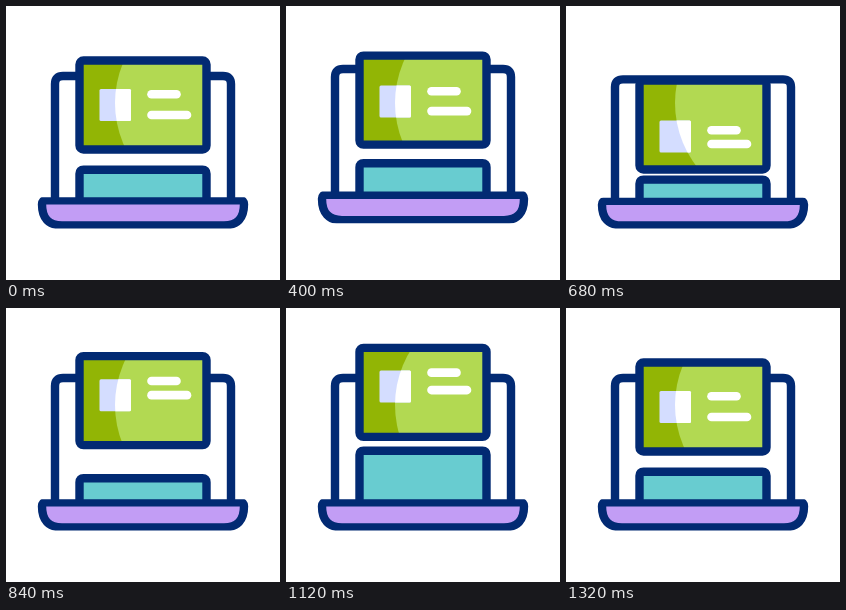
Animation, 274 px wide and 274 px high, one loop 2000 ms. Source, as an HTML page:

```html
<!DOCTYPE html>
<html lang="en">
<head>
<meta charset="utf-8">
<title>Laptop card</title>
<style>
  html, body { margin: 0; width: 100%; height: 100%; overflow: hidden; background: #fff; }
  svg { display: block; width: 100vw; height: 100vh; }
  .line { stroke: #022a73; stroke-width: 8.4; stroke-linejoin: round; }
</style>
</head>
<body>
<svg viewBox="0 0 274 274">
  <defs>
    <clipPath id="inside"><rect id="cardClip" x="73.5" y="54.5" width="127" height="89"/></clipPath>
    <clipPath id="shine"><circle cx="213" cy="97" r="104"/></clipPath>
    <clipPath id="trim"><rect x="28" y="191.2" width="218" height="31.3"/></clipPath>
    <rect id="photo" x="93.5" y="83" width="31.5" height="32" rx="1.5"/>
  </defs>
  <path id="frame" class="line" fill="#fff" d="M49 196V78q0-8 8-8H217q8 0 8 8V196"/>
  <path id="panel" class="line" fill="#68ccd0" d="M73.5 225V167.7q0-4 4-4H196.5q4 0 4 4V225"/>
  <g clip-path="url(#inside)">
    <rect width="274" height="274" fill="#92b505"/>
    <circle cx="213" cy="97" r="104" fill="#b2d952"/>
    <use href="#photo" fill="#d4ddff"/>
    <g clip-path="url(#shine)"><use href="#photo" fill="#fff"/></g>
    <g stroke="#fff" stroke-width="8.6" stroke-linecap="round">
      <path id="bar1" d="M145.5 88.3H170.5"/>
      <path id="bar2" d="M145.5 109H181"/>
    </g>
  </g>
  <rect id="card" class="line" fill="none" x="73.5" y="54.5" width="127" height="89" rx="4"/>
  <rect id="mask" x="28" y="218" width="218" height="56" fill="#fff"/>
  <path id="base" class="line" fill="#c29df5" clip-path="url(#trim)"
    d="M40 194.2H234q4 0 4 4q0 21.2-20 21.2H56q-20 0-20-21.2q0-4 4-4Z"/>
</svg>
<script>
const LOOP = 2000, STEP = 40, FLOOR = 222;

// Sine ease from 0 to 1 between two times.
function ease(t, from, to) {
  const p = Math.min(1, Math.max(0, (t - from) / (to - from)));
  return (1 - Math.cos(Math.PI * p)) / 2;
}

// Rises to 1 at the peak, then falls back to 0.
const bump = (t, from, peak, to) => ease(t, from, peak) * (1 - ease(t, peak, to));

// Hop up, drop by one amount, lift by another, then settle.
function swing(t, hop, drop, lift, low, high) {
  return drop * bump(t, 320, low, high)
    - hop * bump(t, 120, 320, low)
    - lift * bump(t, low, high, 1320);
}

function place(id, transform) {
  document.getElementById(id).setAttribute("transform", transform);
}

function draw(now) {
  const t = Math.floor(now % LOOP / STEP) * STEP;
  const slide = (id, y) => place(id, `translate(0 ${y})`);

  const jump = -8 * bump(t, 120, 320, 520);
  const scale = 1 + .025 * bump(t, 120, 320, 600) - .043 * bump(t, 320, 600, 760);
  for (const id of ["frame", "base", "mask"]) {
    place(id, `translate(0 ${jump + FLOOR * (1 - scale)}) scale(1 ${scale})`);
  }

  const card = swing(t, 8, 20, 25, 690, 960);
  const content = (id, drop, lift) => slide(id, card + swing(t, 0, drop, lift, 690, 920));
  slide("card", card);
  slide("cardClip", card);
  slide("panel", swing(t, 8, 11.5, 22.5, 760, 1080));
  content("photo", 11.5, 11.5);
  content("bar1", 16, 18);
  content("bar2", 9, 24.5);
}

const start = performance.now();
function tick() {
  draw(performance.now() - start);
  requestAnimationFrame(tick);
}
tick();
</script>
</body>
</html>
```
